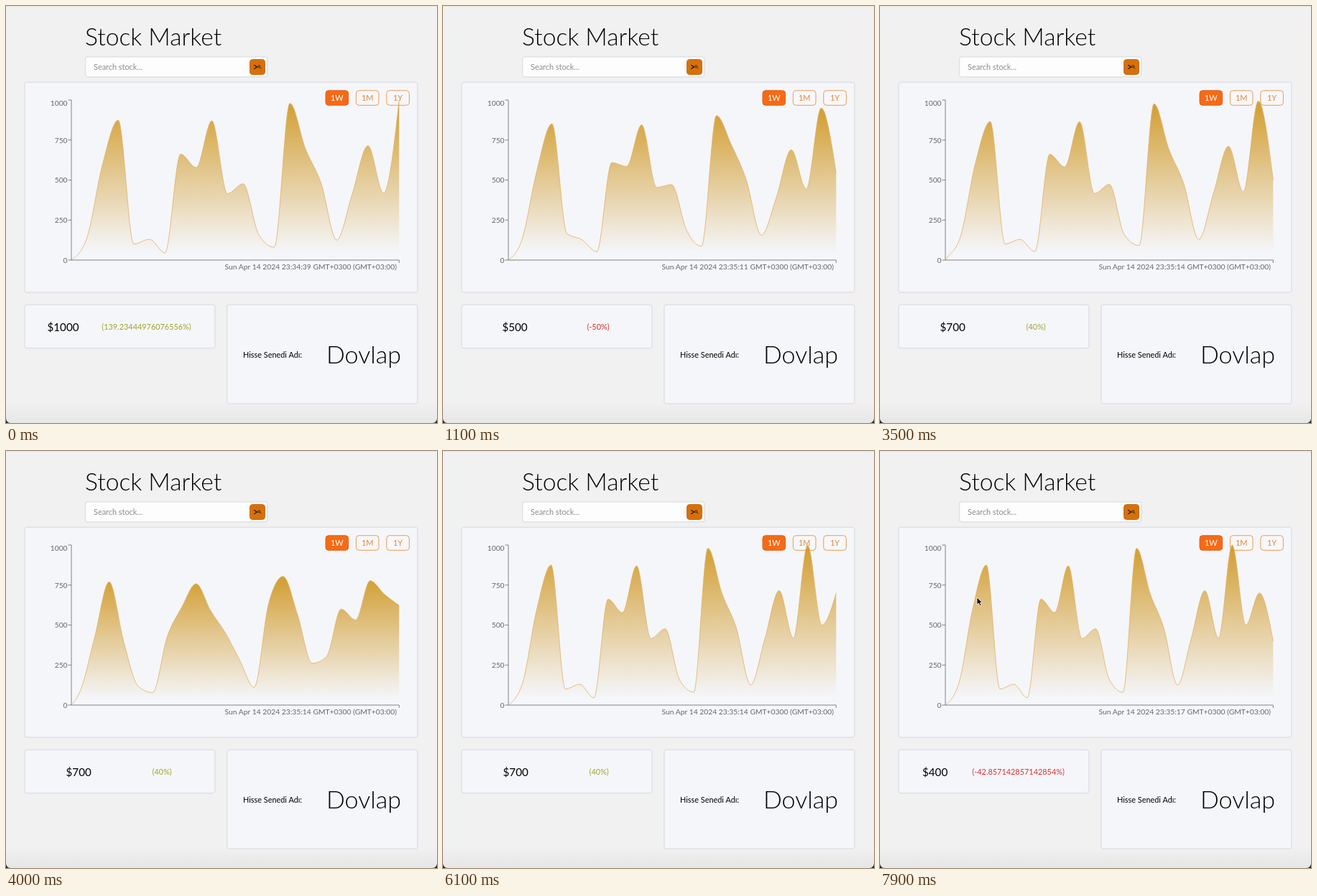
Write an HTML page that moves like this. It is 600 by 581 pixels and loops after 8 s.

```html
<!DOCTYPE html>
<html lang="en">
<head>
<meta charset="utf-8">
<title>Stock Market</title>
<style>
  html, body { margin: 0; width: 100%; height: 100%; overflow: hidden; background: #f2f1f2; }
  svg { display: block; width: 100vw; height: 100vh; }
  text { font-family: Lato, "Open Sans", sans-serif; }
  .large { font-weight: 300; }
  .card { fill: #f5f6fa; stroke: #dfe1e6; stroke-width: 1.5; }
  .axis { fill: none; stroke: #777; stroke-width: .9; }
  .label { fill: #666; font-size: 10.3px; text-anchor: end; }
  .middle { text-anchor: middle; }
  .range rect { fill: #f8f7f9; stroke: #e89c50; }
  .range text { fill: #dd8a42; font-size: 11px; text-anchor: middle; }
  .range .active rect { fill: #f76a15; stroke: #e0601a; }
  .range .active text { fill: #fff; }
  .up { fill: #9da52c; }
  .down { fill: #dc2f35; }
</style>
</head>
<body>
<svg viewBox="0 0 600 581" preserveAspectRatio="none">
  <defs>
    <linearGradient id="fill" x1="0" y1="0" x2="0" y2="1">
      <stop offset=".05" stop-color="#ca8a04" stop-opacity=".78"/>
      <stop offset=".95" stop-color="#ca8a04" stop-opacity="0"/>
    </linearGradient>
    <linearGradient id="shade" x1="0" y1="0" x2="0" y2="1">
      <stop offset="0" stop-color="#e6e6e6" stop-opacity="0"/>
      <stop offset="1" stop-color="#e6e6e6"/>
    </linearGradient>
  </defs>

  <rect width="600" height="581" fill="#f2f1f2"/>
  <rect width="600" height="1.2" fill="#e9e6d8"/>
  <rect y="552" width="600" height="29" fill="url(#shade)"/>
  <path d="M0 575Q.6 580.4 6 581H0ZM600 575Q599.4 580.4 594 581H600Z" fill="#222"/>

  <text class="large" x="110" y="55" font-size="33.6">Stock Market</text>
  <rect x="110.5" y="70.8" width="253.5" height="28" rx="3.5" fill="#fdfdfd" stroke="#dfe1e6" stroke-width="1.5"/>
  <text x="122" y="89" font-size="10.9" fill="#8c8c8c">Search stock...</text>
  <rect x="339.5" y="74.5" width="21" height="21" rx="4" fill="#d6700c" stroke="#cb6a10"/>
  <g fill="none" stroke="#1c1208" stroke-width="1.2">
    <path d="M345.3 82.3L349.6 85L345.3 87.8"/>
    <circle cx="352.3" cy="84.2" r="1.5" stroke-width=".8"/>
    <path d="M353.4 85.4L355.2 87.2" stroke-width=".9"/>
  </g>

  <rect class="card" x="25.8" y="106.3" width="547.2" height="292.7" rx="3.5"/>
  <rect class="card" x="25.8" y="416.3" width="265.2" height="60.5" rx="3.5"/>
  <rect class="card" x="307.8" y="416.3" width="265.2" height="138" rx="3.5"/>

  <g class="range" id="ranges"></g>

  <path id="area" fill="url(#fill)"/>
  <path id="line" fill="none" stroke="#e2b468" stroke-width=".85"/>
  <g id="axes"><path class="axis" d="M91 131V354H547.3V358"/></g>
  <text id="date" class="label" x="544" y="367"></text>

  <text id="price" class="middle" y="453" font-size="15.2"></text>
  <text id="change" class="middle" y="451.3" font-size="10.9"></text>
  <text x="330" y="489.7" font-size="10.9">Hisse Senedi Adı:</text>
  <text class="large middle" x="498" y="498" font-size="34">Dovlap</text>

  <path id="cursor" d="M135 204V214.2L137.4 212L139 215.6L140.8 214.8L139.3 211.3H142.4Z" stroke="#fff" stroke-width=".8"/>
</svg>
<script>
const LOOP = 8000, DURATION = 1500, LEFT = 91, WIDTH = 456.3, BASE = 354, SCALE = .223;
const CURSOR_AT = 7800;
const prices = [0, 140, 600, 875, 100, 130, 45, 662, 578, 870, 415, 477, 160, 80, 980,
  695, 480, 125, 415, 715, 418, 1000, 500, 700, 400];

// "shown" updates the texts; the curve starts moving at "start".
const quotes = [
  { shown: 0, start: -DURATION, count: 22, clock: '34:39', price: 1000, change: '139.23444976076556', x: 79.5 },
  { shown: 90, start: 130, count: 23, clock: '35:11', price: 500, change: '-50', x: 100 },
  { shown: 3420, start: 3465, count: 24, clock: '35:14', price: 700, change: '40', x: 101.2 },
  { shown: 6190, start: 6245, count: 25, clock: '35:17', price: 400, change: '-42.857142857142854', x: 76.6 },
];

const el = id => document.getElementById(id);
const mix = (a, b, k) => a + (b - a) * k;

el('ranges').innerHTML = ['1W', '1M', '1Y'].map((name, i) => {
  const x = 445 + i * 42.4;
  return `<g class="${i ? '' : 'active'}"><rect x="${x}" y="117.8" width="31.6" height="20.5" rx="4"/>
    <text x="${x + 15.8}" y="132">${name}</text></g>`;
}).join('');

el('axes').innerHTML += [0, 250, 500, 750, 1000].map(value => {
  const y = BASE - value * SCALE;
  return `<path class="axis" d="M86.5 ${y}H91"/>
    <text class="label" x="85.6" y="${y + (value === 1000 ? 8.3 : 3.8)}">${value}</text>`;
}).join('');

// cubic-bezier(.25, .1, .25, 1)
function ease(x) {
  if (x <= 0) return 0;
  if (x >= 1) return 1;
  const bezier = (s, a, b) => 3 * (1 - s) ** 2 * s * a + 3 * (1 - s) * s * s * b + s ** 3;
  let low = 0, high = 1;
  for (let i = 0; i < 24; i++) {
    const s = (low + high) / 2;
    if (bezier(s, .25, .25) < x) low = s; else high = s;
  }
  return bezier(low, .1, 1);
}

function pointAt(i, count) {
  return [LEFT + WIDTH * i / (count - 1), BASE - prices[i] * SCALE];
}

// Each point travels from its left neighbour's former place.
function pointsAt(count, k) {
  return Array.from({ length: count }, (_, i) => {
    const to = pointAt(i, count);
    if (k >= 1) return to;
    const from = pointAt(Math.max(0, i - 1), count - 1);
    return [mix(from[0], to[0], k), mix(from[1], to[1], k)];
  });
}

// Monotone cubic interpolation
function curve(all) {
  const p = all.filter((q, i) => !i || q[0] - all[i - 1][0] > 1e-6);
  const n = p.length - 1;
  const h = [], s = [], m = [];
  for (let i = 0; i < n; i++) {
    h[i] = p[i + 1][0] - p[i][0];
    s[i] = (p[i + 1][1] - p[i][1]) / h[i];
  }
  for (let i = 1; i < n; i++) {
    const mean = (s[i - 1] * h[i] + s[i] * h[i - 1]) / (h[i - 1] + h[i]);
    m[i] = (Math.sign(s[i - 1]) + Math.sign(s[i])) *
      Math.min(Math.abs(s[i - 1]), Math.abs(s[i]), Math.abs(mean) / 2);
  }
  m[0] = (3 * s[0] - m[1]) / 2;
  m[n] = (3 * s[n - 1] - m[n - 1]) / 2;
  let d = `M${p[0]}`;
  for (let i = 0; i < n; i++) {
    const [x0, y0] = p[i], [x1, y1] = p[i + 1], third = h[i] / 3;
    d += `C${x0 + third},${y0 + third * m[i]} ${x1 - third},${y1 - third * m[i + 1]} ${x1},${y1}`;
  }
  return d;
}

function render(t) {
  const quote = quotes.filter(q => t >= q.shown).pop();
  const path = curve(pointsAt(quote.count, ease((t - quote.start) / DURATION)));
  el('line').setAttribute('d', path);
  el('area').setAttribute('d', `${path}V${BASE}H${LEFT}Z`);
  el('date').textContent = `Sun Apr 14 2024 23:${quote.clock} GMT+0300 (GMT+03:00)`;
  el('price').textContent = `$${quote.price}`;
  el('price').setAttribute('x', quote.x);
  el('change').textContent = `(${quote.change}%)`;
  el('change').setAttribute('x', quote.x + 116);
  el('change').setAttribute('class', `middle ${quote.change[0] === '-' ? 'down' : 'up'}`);
  el('cursor').style.display = t >= CURSOR_AT ? '' : 'none';
}

function tick() {
  render(performance.now() % LOOP);
  requestAnimationFrame(tick);
}
tick();
</script>
</body>
</html>
```
